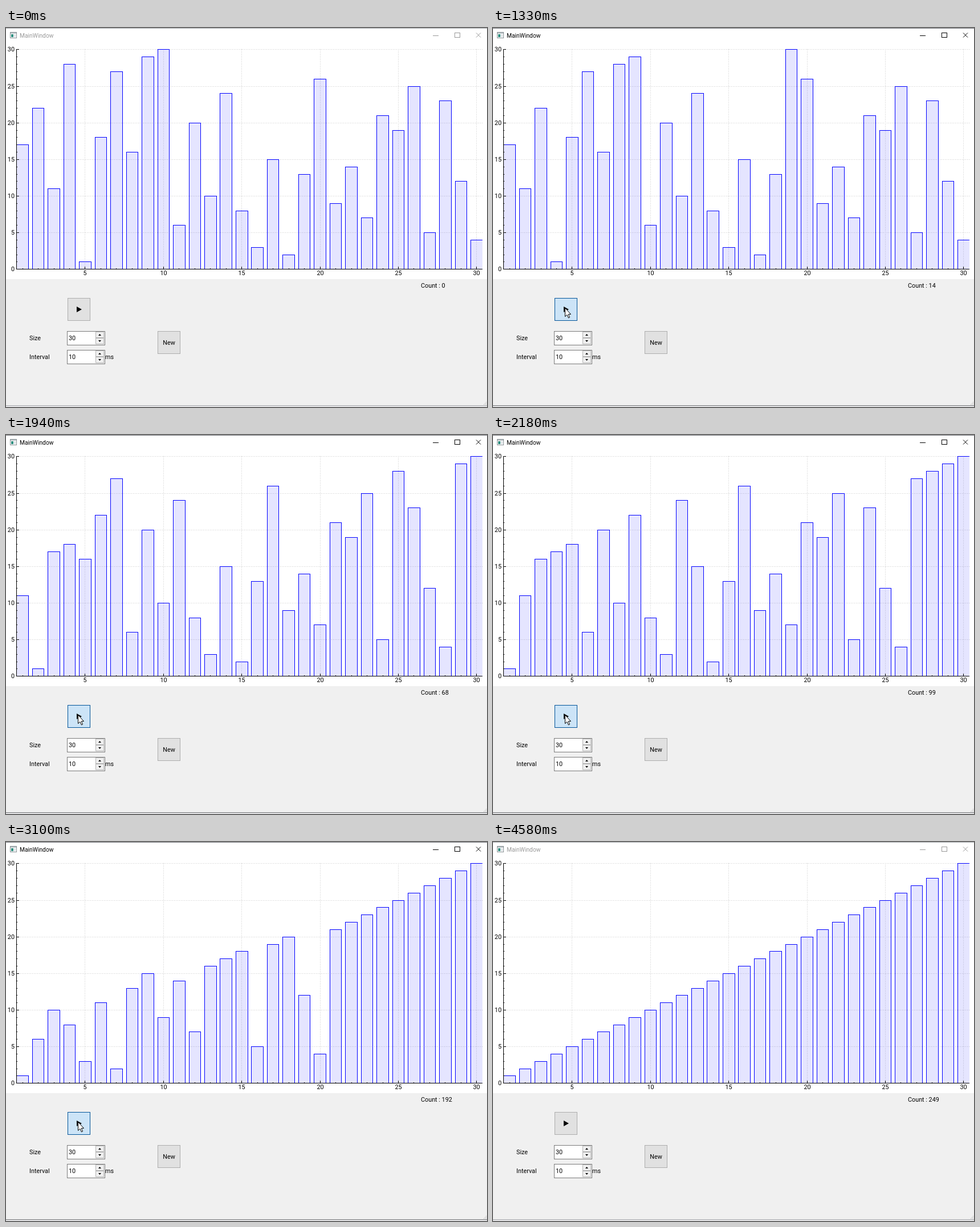
Animation, 844 px wide and 664 px high, one loop 4.74 s. Source, as an HTML page with a canvas:

```html
<!DOCTYPE html>
<html lang="en">
<head>
<meta charset="utf-8">
<title>Bubble sort</title>
<style>
  html, body { margin: 0; width: 100%; height: 100%; overflow: hidden; background: #f0f0f0; }
  canvas { display: block; }
</style>
</head>
<body>
<canvas id="stage" width="844" height="664"></canvas>
<script>
const ctx = document.getElementById('stage').getContext('2d');
const LOOP = 4740, BLUR = 4580;
const ARRIVE = 940, PRESS = 1170, RELEASE = 3680, EXIT = 3800;
const SORT_START = 1181.3, SWAP_MS = 9.98;
const PLOT = { left: 19, right: 836, top: 37, bottom: 422 };
const BAR = 20.6;

// The chart's unsorted values.
const VALUES = [17, 22, 11, 28, 1, 18, 27, 16, 29, 30, 6, 20, 10, 24, 8,
                3, 15, 2, 13, 26, 9, 14, 7, 21, 19, 25, 5, 23, 12, 4];

const clamp = (v, lo, hi) => Math.min(hi, Math.max(lo, v));
const lerp = (a, b, f) => a + (b - a) * f;
const centerOf = k => 1.1 + 27.475 * k;
const xOf = k => Math.round(centerOf(k));
const yOf = v => Math.round(422.3 - 12.83 * v);

// The screen refreshes in runs of seven updates, one run every 540 ms.
function refreshTime(now) {
  if (now < 150) return 0;
  if (now >= BLUR) return BLUR;
  const since = Math.max(0, now - 170);
  const run = Math.min(6, Math.floor(since / 540));
  const step = Math.min(6, Math.floor((since - run * 540) / 76));
  return 170 + run * 540 + step * 76;
}

function bubbleSort(limit) {
  const list = VALUES.slice();
  let swaps = 0;
  for (let end = list.length - 1; end > 0; end--)
    for (let i = 0; i < end; i++) {
      if (list[i] <= list[i + 1]) continue;
      if (swaps >= limit) return { list, swaps };
      [list[i], list[i + 1]] = [list[i + 1], list[i]];
      swaps++;
    }
  return { list, swaps };
}

function box(x, y, w, h, color) {
  ctx.fillStyle = color;
  ctx.fillRect(x, y, w, h);
}

function frame(x, y, w, h, color, fill) {
  if (fill) box(x, y, w, h, fill);
  ctx.strokeStyle = color;
  ctx.strokeRect(x + .5, y + .5, w - 1, h - 1);
}

function line(x1, y1, x2, y2, color, dash = []) {
  ctx.strokeStyle = color;
  ctx.setLineDash(dash);
  ctx.beginPath();
  ctx.moveTo(x1, y1);
  ctx.lineTo(x2, y2);
  ctx.stroke();
  ctx.setLineDash([]);
}

function shape(points, fill) {
  ctx.beginPath();
  points.forEach(([x, y]) => ctx.lineTo(x, y));
  ctx.closePath();
  ctx.fillStyle = fill;
  ctx.fill();
}

function label(text, x, y, align = 'left', color = '#000', size = 10.8) {
  ctx.font = `${size}px Roboto, sans-serif`;
  ctx.textAlign = align;
  ctx.fillStyle = color;
  ctx.fillText(text, x, y);
}

function drawWindow(active) {
  box(0, 0, 844, 440, '#fff');
  box(0, 440, 844, 224, '#f0f0f0');
  const edge = active ? '#74767a' : '#a9abaf';
  box(0, 0, 844, 1, edge);
  box(0, 661, 844, 1, edge);
  box(0, 662, 844, 2, '#e4e4e6');

  frame(7, 7, 12, 11, '#8a9296', '#fff');
  box(8, 8, 10, 2, '#b9c2c6');
  box(9, 11, 4, 5, '#2f8f80');
  box(14, 11, 3, 5, '#dde3e6');

  const ink = active ? '#000' : '#999';
  label('MainWindow', 24, 17, 'left', ink, 10.3);
  box(749, 13, 10, 1, ink);
  frame(787, 8, 10, 9, ink);
  line(825, 8.5, 833, 16.5, ink);
  line(833, 8.5, 825, 16.5, ink);

  for (let row = 0; row < 3; row++)
    for (let col = 0; col <= row; col++)
      box(842 - 2 * col, 655 + 2 * row, 1, 1, '#b4b4b4');
}

function drawChart(list) {
  const { left, right, top, bottom } = PLOT;
  for (let v = 5; v <= 30; v += 5) {
    line(left, yOf(v) + .5, right, yOf(v) + .5, '#c8c8c8', [1, 2]);
    line(xOf(v) + .5, bottom, xOf(v) + .5, top, '#c8c8c8', [1, 2]);
  }

  ctx.save();
  ctx.beginPath();
  ctx.rect(left, top, right - left, bottom - top + 1);
  ctx.clip();
  list.forEach((v, i) => {
    const edge = centerOf(i + 1) - BAR / 2;
    const x = Math.round(edge), w = Math.round(edge + BAR) - x + 1;
    frame(x, yOf(v), w, bottom - yOf(v) + 1, '#00f', 'rgba(0,0,255,.1)');
  });
  ctx.restore();

  box(18, top, 1, bottom - top + 1, '#000');
  box(18, bottom, right - 18, 1, '#000');
  for (let v = 0; v <= 30; v++) {
    const major = v % 5 === 0, size = major ? 5 : 2;
    box(18, yOf(v), size, 1, '#000');
    if (v) box(xOf(v), bottom - size + 1, 1, size, '#000');
    if (major) label(v, 15, yOf(v) + 4, 'right');
    if (major && v) label(v, xOf(v) + .5, 433, 'center');
  }
}

function drawSpin(y, value) {
  frame(107, y, 67, 25, '#7a7a7a', '#fff');
  for (const top of [y + 1, y + 12]) frame(157, top, 15, 11, '#b4b4b4', '#f0f0f0');
  shape([[162, y + 8], [167, y + 8], [164.5, y + 5]], '#000');
  shape([[162, y + 16], [167, y + 16], [164.5, y + 19]], '#000');
  label(value, 110, y + 16);
}

function buttonLook(t) {
  if (t < ARRIVE || t >= BLUR) return ['#adadad', '#e1e1e1'];
  if (t < ARRIVE + 60) return ['#5a9ccb', '#e3e9ef'];
  if (t < PRESS) return ['#0078d7', '#e5f1fb'];
  if (t < RELEASE) return ['#005499', '#cce4f7'];
  return ['#0078d7', '#e1e1e1'];
}

function drawControls(t, swaps) {
  label('Count : ' + swaps, 728, 455);
  frame(108, 473, 40, 40, ...buttonLook(t));
  shape([[124, 488], [124, 498], [133, 493]], '#000');
  label('Size', 41, 547);
  label('Interval', 41, 580);
  drawSpin(531, '30');
  drawSpin(564, '10');
  label('ms', 174, 580);
  frame(266, 531, 40, 40, '#adadad', '#e1e1e1');
  label('New', 286, 555, 'center');
}

// Slows down onto the button, rests there, then drops out of the window.
function drawPointer(t) {
  if (t < 150 || t > EXIT) return;
  const left = 1 - clamp((t - 150) / (ARRIVE - 150), 0, 1);
  const nudge = clamp((t - ARRIVE - 80) / 150, 0, 1);
  const leave = clamp((t - 3640) / (EXIT - 3640), 0, 1) ** 1.6;
  const x = lerp(132, 724, left ** 2.3) - 6 * nudge + 39 * leave;
  const y = lerp(490, 648, left ** 4) + 130 * leave;
  ctx.save();
  ctx.translate(Math.round(x) + .5, Math.round(y) + .5);
  shape([[0, 0], [0, 15], [3.5, 12], [6, 17.5], [8, 16.5], [5.8, 11], [10, 11]], '#fff');
  ctx.strokeStyle = '#000';
  ctx.stroke();
  ctx.restore();
}

function render() {
  const t = refreshTime(performance.now() % LOOP);
  const { list, swaps } = bubbleSort(Math.floor((t - SORT_START) / SWAP_MS));
  drawWindow(t >= PRESS && t < BLUR);
  drawChart(list);
  drawControls(t, swaps);
  drawPointer(t);
  requestAnimationFrame(render);
}
render();
</script>
</body>
</html>
```
